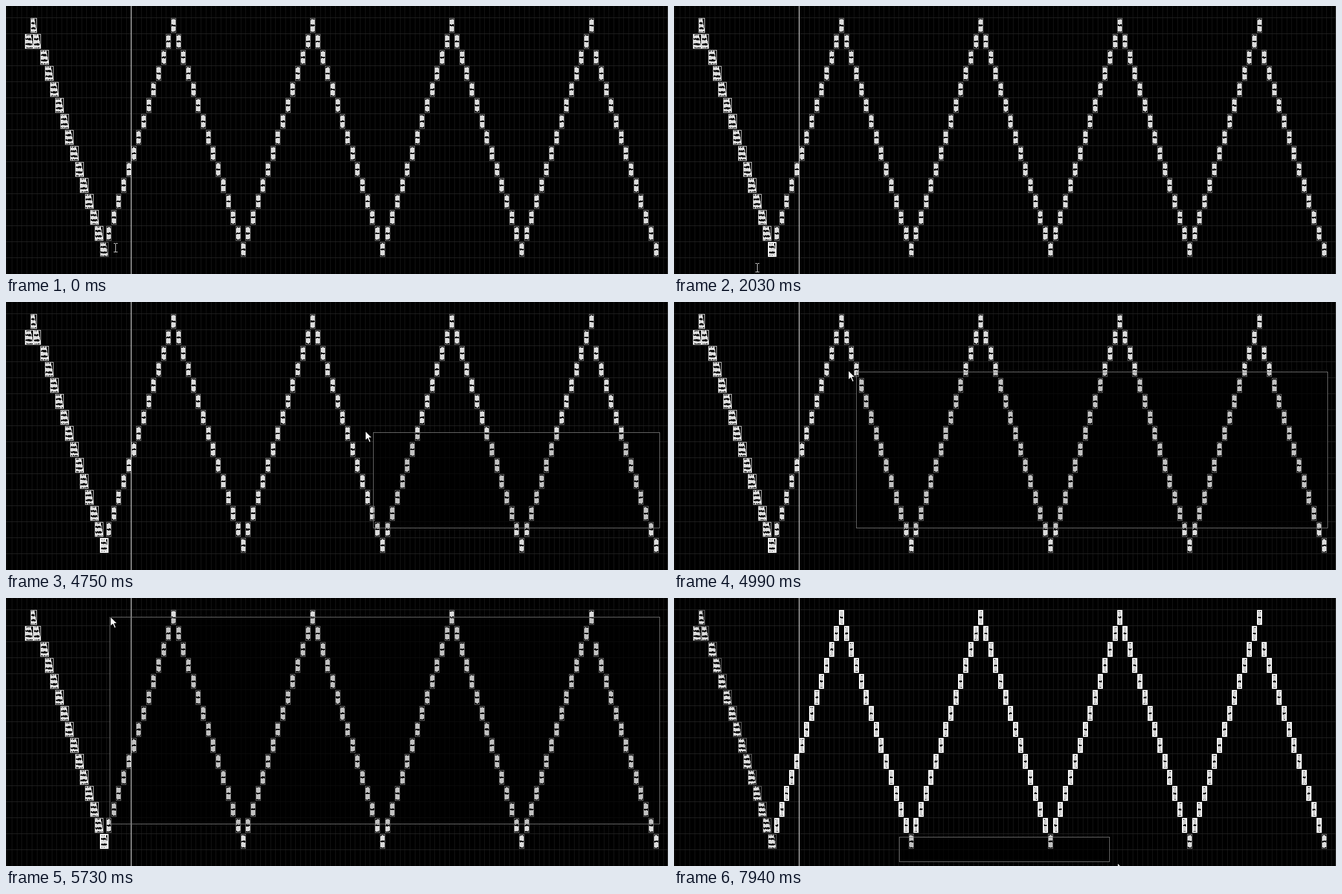
Recreate the animation shown at these times as an HTML page with a canvas. Size 1156 by 469 pixels, loop 8000 ms.

```html
<!DOCTYPE html>
<html lang="en">
<head>
<meta charset="utf-8">
<title>Item selection</title>
<style>
html, body { margin: 0; width: 100%; height: 100%; overflow: hidden; background: #000; }
canvas { display: block; }
</style>
</head>
<body>
<canvas id="stage" width="1156" height="469"></canvas>
<script>
const W = 1156, H = 469, LOOP = 8000, TICK = 120;
const ROW = 28, TOP = 20, STEP = 8.686, ORIGIN = 166.4;
const g = document.getElementById('stage').getContext('2d');

// A straight pointer move made in equal jumps
const move = (start, steps, from, to = from) => ({ start, steps, from, to });
// The same while dragging a marquee; lag is the corner's offset from the pointer
const drag = (start, steps, from, to, anchor, lag) => ({ start, steps, from, to, anchor, lag });

const right = [1141, 395];
const moves = [
  move(0, 1, [191, 423]),
  move(270, 5, [193, 424], [217, 429]),
  drag(1000, 3, [200, 438], [145, 458], [213, 421], [1, 0]),
  move(2030, 1, [145, 458]),
  move(3440, 1, [153, 457]),
  move(3590, 2, [700, 380], [1128, 311]),
  move(3860, 2, [1136, 332], [1150, 359]),
  move(4130, 1, [1149, 384]),
  drag(4270, 4, [1138, 394], [800, 280], right, [2, 0]),
  drag(4750, 3, [627, 226], [304, 120], right, [14, 2]),
  drag(5130, 2, [220, 85], [190, 68], right, [3, 0]),
  drag(5370, 2, [172, 52], [161, 40], right, [1, 1]),
  drag(5610, 2, [173, 34], [182, 33], right, [-1, 0]),
  move(6280, 1, [184, 33]),
  move(6640, 1, [193, 43]),
  move(6790, 2, [330, 190], [505, 368]),
  move(7060, 3, [453, 380], [398, 427]),
  drag(7580, 4, [440, 428], [774, 464], [393, 418], [-14, -3])
];

function pointerAt(t) {
  const m = moves.filter(s => s.start <= t).pop();
  const i = Math.min(m.steps - 1, Math.floor((t - m.start) / TICK));
  const k = m.steps > 1 ? i / (m.steps - 1) : 0;
  const [x, y] = m.from.map((v, a) => Math.round(v + (m.to[a] - v) * k));
  if (!m.anchor) return { x, y };
  const [ax, ay] = m.anchor, cx = x + m.lag[0], cy = y + m.lag[1];
  const area = [Math.min(ax, cx), Math.min(ay, cy), Math.abs(ax - cx) + 1, Math.abs(ay - cy) + 1];
  return { x, y, area };
}

function noise(n) {
  const v = Math.sin(n * 127.1 + 11.7) * 43758.5453;
  return v - Math.floor(v);
}

function box(x, y, w, h, color) {
  g.fillStyle = color;
  g.fillRect(x, y, w, h);
}

function frame(x, y, w, h, color, line = 1) {
  g.strokeStyle = color;
  g.lineWidth = line;
  g.strokeRect(x + line / 2, y + line / 2, w - line, h - line);
}

function drawGrid() {
  box(0, 0, W, H, '#000');
  for (let x = 1.4; x < W; x += STEP) box(Math.round(x), 0, 1, H, '#161616');
  for (let r = 0; r <= 15; r++) box(0, TOP + r * ROW, W, 1, '#232323');
  box(W - 1, 0, 1, H, '#3a3a3a');
}

function drawNarrow(n, selected) {
  const row = n > 98 ? n - 97 : Math.abs(14 - n % 28);
  const x = Math.round(ORIGIN + n * STEP), y = TOP + 1 + row * ROW;
  const on = selected && row < 14;
  box(x, y, 9, 26, '#000');
  for (let i = 1; i < 8; i++) {
    const edge = Math.abs(i - 4) > 2 ? 1 : 0;
    for (let c = 0; c < 2; c++) {
      const k = n * 16 + i * 2 + c;
      const up = 4 + Math.round(noise(k) * 1.4) - edge * (1 - c);
      const down = 4 + Math.round(noise(k + 5000) * 1.4) - edge * c;
      box(x + i, y + (c ? 19 : 7) - up, 1, up + down, on ? '#d0d0d0' : '#dcdcdc');
    }
  }
  frame(x, y, 9, 26, on ? '#fff' : '#7c7c7c', on ? 2 : 1);
}

function drawWide(left, row, w, seed, selected) {
  const x = Math.round(left), y = TOP + 1 + row * ROW;
  box(x, y, w, 26, '#000');
  for (let i = 1; i < w - 1; i++) {
    const rim = 1 + Math.round(noise(seed * 40 + i) * 2);
    const last = 26 - rim;
    // the right side narrows along the fade
    const start = Math.max(rim, Math.round((i - w + 5) * 6));
    if (start < last) box(x + i, y + start, 1, last - start, '#dcdcdc');
    for (const mid of [9, 18]) {
      const bulge = Math.abs(i - w / 2) < 3 ? 1 : 0;
      const h = 1.5 + noise(seed * 70 + i + mid * 9) * 2 + bulge;
      box(x + i, Math.round(y + mid - h / 2), 1, Math.round(h), '#0c0c0c');
    }
  }
  frame(x, y, w, 26, selected ? '#d8d8d8' : '#6c6c6c');
  g.strokeStyle = selected ? '#fff' : '#8a8a8a';
  g.lineWidth = 1;
  g.beginPath();
  g.moveTo(x + w - 5.5, y + .5);
  g.lineTo(x + w - .5, y + 25.5);
  g.stroke();
}

function drawItems(t) {
  const second = t >= 6280;
  drawWide(43, 0, 11, 1, !second);
  drawWide(33, 1, 15, 2, !second);
  drawWide(48, 1, 13, 3, !second);
  for (let row = 2; row < 15; row++) {
    const on = !second && (row < 14 || t >= 2030);
    const x = 164 - (14 - row) * STEP;
    drawWide(x, row, 15, row + 4, on);
    if (row === 14 && on) frame(x, TOP + 1 + row * ROW, 15, 26, '#fff', 2);
  }
  for (let n = 1; n < 112; n++) drawNarrow(n, second);
}

function drawBeam(x, y) {
  box(x - 1, y - 7, 3, 15, '#000');
  box(x, y - 7, 1, 15, '#e8e8e8');
  for (const end of [y - 8, y + 7]) {
    box(x - 3, end, 3, 1, '#e8e8e8');
    box(x + 1, end, 3, 1, '#e8e8e8');
  }
}

function drawArrow(x, y) {
  g.save();
  g.translate(x + .5, y);
  const arrow = new Path2D('M0 0V16L4 12.5 7 19.5 9.5 18.5 6.5 11.5H11.5Z');
  g.fillStyle = '#fff';
  g.strokeStyle = '#000';
  g.lineWidth = 1;
  g.fill(arrow);
  g.stroke(arrow);
  g.restore();
}

function draw(t) {
  const { x, y, area } = pointerAt(t);
  drawGrid();
  if (area) box(...area, 'rgba(0,0,0,.65)');
  drawItems(t);
  if (area) box(...area, 'rgba(0,0,0,.12)');
  box(218, 0, 1, H, '#fff');
  if (area) {
    frame(...area, '#7a7a7a');
    drawArrow(x, y);
  } else {
    drawBeam(x, y);
  }
}

function tick(now) {
  draw(now % LOOP);
  requestAnimationFrame(tick);
}
draw(0);
requestAnimationFrame(tick);
</script>
</body>
</html>
```
